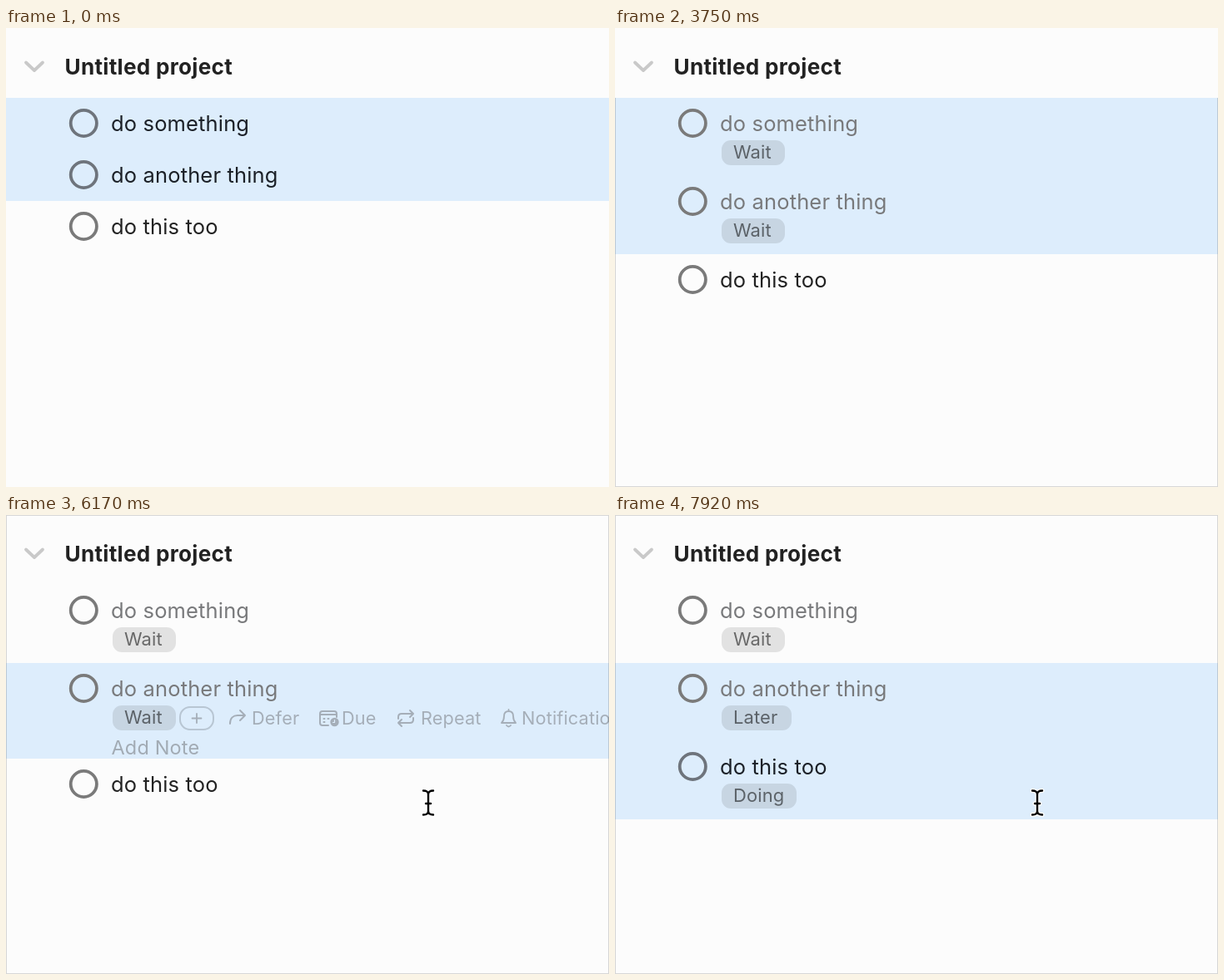
These frames come from a looping animation (724x552 px, 8000 ms). An HTML page with a canvas:

```html
<!DOCTYPE html>
<html lang="en">
<head>
<meta charset="utf-8">
<title>Task list</title>
<style>
  html, body { margin: 0; width: 100%; height: 100%; overflow: hidden; background: #fcfcfc; }
  canvas { display: block; }
</style>
</head>
<body>
<canvas id="stage" width="724" height="552"></canvas>
<script>
const W = 724, H = 552, LOOP = 8000, FPS = 12;
const ctx = document.getElementById('stage').getContext('2d');
const FONT = 'Inter, Roboto, sans-serif';
const BLUE = '#ddedfc', PALE = '#a5aeb8';
const PILL_WIDTH = { Doing: 90, Next: 78, Wait: 76, Later: 84 };

const mix = (a, b, p) => a + (b - a) * p;
const smooth = (t, start, length) => {
  const p = Math.min(1, Math.max(0, (t - start) / length));
  return p * p * (3 - 2 * p);
};

function text(label, x, y, size, color, weight = 400) {
  ctx.font = `${weight} ${size}px ${FONT}`;
  ctx.letterSpacing = weight > 400 ? '0.3px' : '0.15px';
  ctx.fillStyle = color;
  ctx.fillText(label, x, y);
}

function stroke(path, color, width) {
  ctx.strokeStyle = color;
  ctx.lineWidth = width;
  ctx.lineCap = ctx.lineJoin = 'round';
  ctx.stroke(path instanceof Path2D ? path : new Path2D(path));
}

function fill(path, color) {
  ctx.fillStyle = color;
  ctx.fill(path);
}

function circle(x, y, r) {
  const path = new Path2D();
  path.arc(x, y, r, 0, Math.PI * 2);
  return path;
}

function box(x, y, w, h, r) {
  const path = new Path2D();
  path.roundRect(x, y, w, h, r);
  return path;
}

function at(x, y, draw) {
  ctx.save();
  ctx.translate(x, y);
  draw();
  ctx.restore();
}

// Inspector buttons below the task; y = 0 is the middle of the line.
function drawDetails(hover) {
  stroke(box(209, -13, 40, 27, 12), '#b8c6d3', 2);
  stroke('M223.5 .5h11M229 -5v11', PALE, 1.8);

  stroke('M269 7C269 0 273 -3 278 -3H287M281 -9L287 -3L281 3', PALE, 2);
  text('Defer', 295, 8, 21.7, PALE);

  stroke('M387 9H380Q377 9 377 6V-5Q377 -8 380 -8H394Q397 -8 397 -5V-1M378 -4H396', PALE, 2);
  stroke('M381.5 1h1M386.5 1h1M381.5 5h1', PALE, 2);
  fill(circle(394.5, 5, 5.2), PALE);
  stroke('M394.5 2.5V5.5H392.5', BLUE, 1.2);
  text('Due', 403, 8, 21.7, PALE);

  const repeat = hover ? '#737c85' : PALE;
  stroke('M471 1V-1Q471 -5 475 -5H489M485 -9L489 -5L485 -1', repeat, 2);
  stroke('M489 0V2Q489 6 485 6H471M475 2L471 6L475 10', repeat, 2);
  text('Repeat', 498, 8, 21.7, repeat);

  stroke('M595 6Q598 3 598 -2Q598 -8 603.5 -8Q609 -8 609 -2Q609 3 612 6ZM601 9Q603.5 12 606 9M603.5 -10v1', PALE, 1.8);
  text('Notifications', 619, 8, 21.7, PALE);
}

function drawRow(row) {
  const { top, height, selected, waiting } = row;
  ctx.save();
  ctx.beginPath();
  ctx.rect(0, top, W, height);
  ctx.clip();
  if (selected) {
    ctx.fillStyle = BLUE;
    ctx.fillRect(0, top, W, height);
  }
  at(0, top, () => {
    stroke(circle(93.3, 30.5, 15.6), selected && !waiting ? '#6e747c' : '#7a7a7a', 3.8);
    const ink = selected ? '#1b2027' : '#222';
    text(row.label, 126, 40, 25.5, waiting ? '#78797b' : ink);
    if (row.tag) {
      fill(box(128, 51, PILL_WIDTH[row.tag], 30, 11), 'rgba(0,0,0,.1)');
      text(row.tag, 142, 73.3, 21.9, 'rgba(0,0,0,.54)');
    }
    if (row.details) {
      at(0, 66, () => drawDetails(row.hover));
      text('Add Note', 126.5, 110, 23.5, '#a2abb4');
    }
    if (row.noteRest) text('Add Note', 126.5, 108, 23.5, '#c3ced8');
  });
  ctx.restore();
}

function drawBorder(t, rows) {
  if (t < 1400) return;
  ctx.fillStyle = 'rgba(0,0,0,.15)';
  const settled = t > 1650, full = t > 5650;
  const top = full ? 0 : 84;
  const leftEnd = settled ? H : rows[2].top;
  const rightEnd = settled ? H : rows[2].top + rows[2].height;
  ctx.fillRect(0, top, 1, leftEnd - top);
  ctx.fillRect(W - 1, top, 1, rightEnd - top);
  if (settled) ctx.fillRect(1, H - 1, W - 2, 1);
  if (full) ctx.fillRect(1, 0, W - 2, 1);
}

function drawArrow(x, y) {
  at(x, y, () => {
    const arrow = new Path2D('M1.5 1V29L8 23L12.5 33.5L17.5 31.3L13 21.2H21.5Z');
    ctx.shadowColor = 'rgba(0,0,0,.35)';
    ctx.shadowBlur = 4;
    ctx.shadowOffsetY = 2;
    stroke(arrow, '#fff', 3.2);
    ctx.shadowColor = 'transparent';
    fill(arrow, '#000');
  });
}

function drawBeam(x, y) {
  at(x, y, () => {
    const beam = new Path2D('M-6 -14.5Q0 -14.5 0 -10Q0 -14.5 6 -14.5M0 -10V10M-6 14.5Q0 14.5 0 10Q0 14.5 6 14.5M-3 1H3');
    stroke(beam, '#fff', 5);
    stroke(beam, '#000', 2.4);
  });
}

function drawClick(x, y, r) {
  stroke(circle(x, y, r), '#fff', 5);
  stroke(circle(x, y, r), '#000', 2.8);
}

function drawPointer(t) {
  if (t < 4490) return;
  if (t < 4990) {
    const p = smooth(t, 4450, 383);
    drawArrow(mix(641, 535, p), mix(413, 280, p));
  } else if (t < 6070) {
    const p = smooth(t, 5083, 167);
    if (t > 5070 && t < 5150) drawClick(535, 236, 42.8);
    drawArrow(mix(535, 528, p), mix(235, 234, p));
  } else {
    const p = smooth(t, 6000, 167);
    if (t > 6400 && t < 6490) drawClick(507, 346, 33.5);
    drawBeam(mix(516, 507, p), mix(290, 346, p));
  }
}

function layout(t) {
  const firstTag = t < 1400 ? '' : t < 2490 ? 'Doing' : t < 3490 ? 'Next' : 'Wait';
  const rowHeight = 62 + 32 * smooth(t, 1320, 250);
  const waiting = t > 3490;
  const lastTagged = t > 7570;
  const details = t > 5650 && t < 6570;
  const opened = details ? 21 * smooth(t, 5580, 165) : 0;
  const closing = t >= 6570 ? 21 * (1 - smooth(t, 6518, 240)) : 0;

  // Edges are rounded as a whole so that neighbouring rows meet without a seam.
  const second = Math.round(84 + rowHeight);
  const secondEnd = Math.round(84 + 2 * rowHeight + opened);
  const third = Math.round(secondEnd + closing);
  return [
    { label: 'do something', top: 84, height: second - 84, tag: firstTag, waiting, selected: t < 5650 },
    { label: 'do another thing', top: second, height: secondEnd - second,
      tag: lastTagged ? 'Later' : firstTag, waiting, selected: true,
      details, hover: t < 6070, noteRest: closing > 0 },
    { label: 'do this too', top: third, height: Math.round(62 + 32 * smooth(t, 7486, 250)),
      tag: lastTagged ? 'Doing' : '', selected: t > 6490 }
  ];
}

function draw(t) {
  ctx.fillStyle = '#fcfcfc';
  ctx.fillRect(0, 0, W, H);
  stroke('M24 41.5L34 51L44 41.5', '#c9c9c9', 3.8);
  text('Untitled project', 70.5, 56, 26.1, '#222', 700);
  const rows = layout(t);
  rows.forEach(drawRow);
  drawBorder(t, rows);
  drawPointer(t);
}

function tick() {
  const t = performance.now() % LOOP;
  draw(Math.floor((t + 5) * FPS / 1000) * 1000 / FPS);
  requestAnimationFrame(tick);
}
tick();
</script>
</body>
</html>
```
